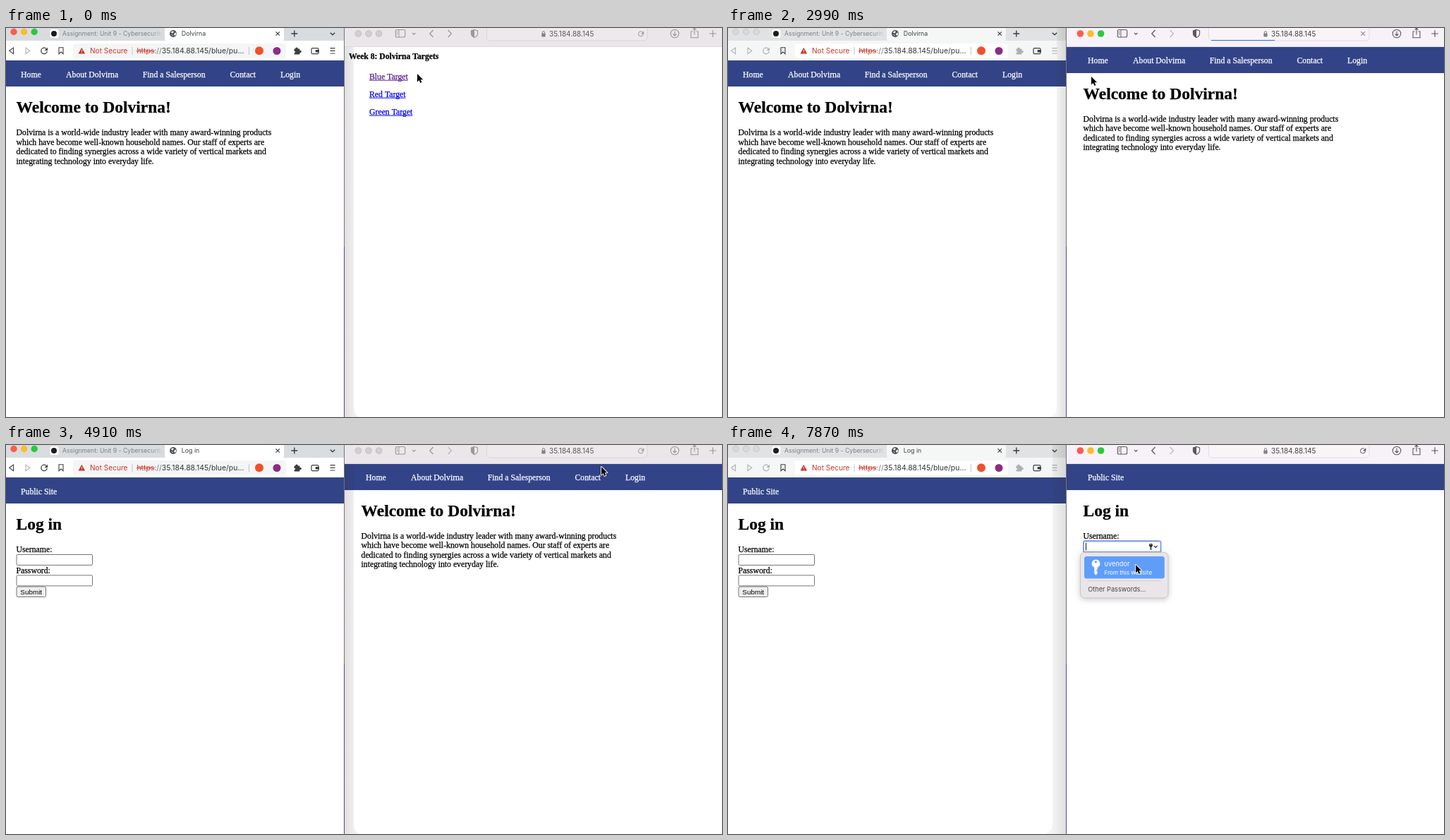
Write an HTML page with a canvas that moves like this. It is 1015 px wide and 552 px high and loops after 8 s.

```html
<!DOCTYPE html>
<html lang="en">
<head>
<meta charset="utf-8">
<title>Two browser windows</title>
<style>
html, body { margin: 0; width: 100%; height: 100%; overflow: hidden; background: #fff; }
canvas { display: block; }
</style>
</head>
<body>
<canvas id="stage" width="1015" height="552"></canvas>
<script>
const ctx = document.getElementById('stage').getContext('2d');
const LOOP = 8000, W = 1015, H = 552, SPLIT = 480;
const SERIF = '"Liberation Serif", serif';
const UI = 'Inter, sans-serif';
const ARIAL = '"Liberation Sans", sans-serif';
const BRAND = 'Dolvirna';
const USER = 'uvendor';
const NAVY = '#324487';

// Pointer positions, held until the next entry: time, x, y, hand?
const pointer = [
  [0, 583, 65], [150, 578, 66], [300, 562, 69], [450, 550, 70], [600, 548, 70], [740, 548, 70, 1],
  [2540, 548, 70], [2840, 545, 70], [2990, 515, 69], [3130, 455, 68], [3280, 418, 67], [3430, 405, 66],
  [3570, 404, 66], [4170, 404, 66, 1], [4320, 404, 66], [4470, 425, 64], [4620, 560, 52], [4760, 720, 38],
  [4910, 844, 31], [5060, 940, 34], [5200, 976, 40], [5350, 950, 44], [5500, 905, 47], [5650, 894, 47],
  [5800, 894, 48, 1], [6400, 894, 46], [6990, 850, 70], [7140, 730, 130], [7280, 630, 178],
  [7430, 585, 185], [7580, 582, 180], [7730, 578, 172], [7870, 578, 170]
];

// Loading bar lengths: time, width
const progress = [
  [0, 0], [2690, 35], [2990, 90], [3280, 160], [3570, 221], [3720, 0],
  [6550, 12], [6700, 24], [6840, 35], [7140, 80], [7430, 130], [7580, 180], [7730, 221], [7870, 0]
];

const between = (t, a, b) => t >= a && t < b;

function held(keys, t) {
  let found = keys[0];
  for (const key of keys) if (key[0] <= t) found = key;
  return found;
}

function rect(x, y, w, h, color) {
  ctx.fillStyle = color;
  ctx.fillRect(x, y, w, h);
}

function rounded(x, y, w, h, r, fill, line, width = 1) {
  ctx.beginPath();
  ctx.roundRect(x, y, w, h, r);
  if (fill) { ctx.fillStyle = fill; ctx.fill(); }
  if (line) { ctx.strokeStyle = line; ctx.lineWidth = width; ctx.stroke(); }
}

function disc(x, y, r, color) {
  ctx.fillStyle = color;
  ctx.beginPath();
  ctx.arc(x, y, r, 0, Math.PI * 2);
  ctx.fill();
}

function ring(x, y, r, color, width = 1, from = 0, to = Math.PI * 2) {
  ctx.strokeStyle = color;
  ctx.lineWidth = width;
  ctx.beginPath();
  ctx.arc(x, y, r, from, to);
  ctx.stroke();
}

function stroke(d, color, width = 1) {
  ctx.strokeStyle = color;
  ctx.lineWidth = width;
  ctx.stroke(new Path2D(d));
}

function fill(d, color) {
  ctx.fillStyle = color;
  ctx.fill(new Path2D(d));
}

function text(str, x, y, size, color = '#000', family = SERIF, weight = 400, align = 'left') {
  ctx.font = `${weight} ${size}px ${family}`;
  ctx.fillStyle = color;
  ctx.textAlign = align;
  ctx.fillText(str, x, y);
  if (family === SERIF) {
    // A hairline gives the page text its heavier stems
    ctx.strokeStyle = color;
    ctx.lineWidth = 0.25;
    ctx.strokeText(str, x, y);
  }
  return ctx.measureText(str).width;
}

function label(str, x, y, size, color, weight) {
  return text(str, x, y + size * 0.36, size, color, UI, weight);
}

function lights(x, y, gap, r, on, off) {
  ['#fc5b52', '#fdbb2d', '#2bc840'].forEach((c, i) => {
    disc(x + gap * i, y, r, on ? c : off);
    if (!on) ring(x + gap * i, y, r - 0.5, 'rgba(0,0,0,.08)');
  });
}

function reload(x, y, color, r = 4.2, width = 1.3) {
  ring(x, y, r, color, width, 0.1, 5.4);
  fill(`M${x + r + 0.8} ${y - r - 0.6}v4.4h-4.4z`, color);
}

function cross(x, y, r, color, width = 1.2) {
  stroke(`M${x - r} ${y - r}l${2 * r} ${2 * r}m0 ${-2 * r}l${-2 * r} ${2 * r}`, color, width);
}

function plus(x, y, r, color, width = 1.4) {
  stroke(`M${x - r} ${y}h${2 * r}M${x} ${y - r}v${2 * r}`, color, width);
}

function nav(x, y, width, items) {
  rect(x, Math.round(y), width, 37, NAVY);
  const offsets = [21, 85, 193.7, 317.5, 389];
  const shift = x ? 489 : 0;
  items.forEach((item, i) => text(item, shift + offsets[i], y + 23.5, 11.77, '#fff'));
}

function homePage(x, y, width) {
  nav(x, y, width, ['Home', `About ${BRAND}`, 'Find a Salesperson', 'Contact', 'Login']);
  const left = x ? 503.5 : 14.5;
  text(`Welcome to ${BRAND}!`, left, y + 74, 23.5, '#000', SERIF, 700);
  [
    `${BRAND} is a world-wide industry leader with many award-winning products`,
    'which have become well-known household names. Our staff of experts are',
    'dedicated to finding synergies across a wide variety of vertical markets and',
    'integrating technology into everyday life.'
  ].forEach((line, i) => text(line, left, y + 106.2 + i * 13.5, 11.77));
}

function loginPage(x, y, width) {
  nav(x, y, width, ['Public Site']);
  const left = x ? 503.5 : 14.5;
  text('Log in', left, y + 74, 23.5, '#000', SERIF, 700);
  ['Username:', 'Password:'].forEach((name, i) => {
    const top = y + 106.2 + i * 29.4;
    text(name, left, top, 11.77);
    rounded(left + 0.5, top + 3.3, 107.5, 15, 1.5, '#fff', '#767676');
  });
  rounded(left + 0.5, y + 155, 41.5, 14.5, 2, '#efefef', '#767676');
  text('Submit', left + 21.2, y + 165.6, 9.9, '#000', ARIAL, 400, 'center');
}

function targetPage() {
  text(`Week 8: ${BRAND} Targets`, 486, 43.5, 11.65, '#000', SERIF, 700);
  ['Blue', 'Red', 'Green'].forEach((name, i) => {
    const color = i ? '#0000ee' : '#551a8b';
    const y = 72.5 + i * 25;
    const w = text(`${name} Target`, 515, y, 11.77, color);
    rect(515, y + 1.3, w, 0.9, color);
  });
}

function leftChrome(active, title) {
  const dark = '#3b3e42', faint = '#aeb1b4';
  const ink = active ? dark : faint;
  rect(0, 0, 479, 18, active ? '#d8dcdf' : '#e0e2e3');
  rounded(225, -8, 169, 28, 5, active ? '#fff' : '#f5f6f6');
  rect(0, 18, 479, 28, active ? '#fff' : '#f5f6f6');
  lights(11, 5.5, 14.6, 4.7, active, '#d7d9da');

  // Tabs
  rounded(62.5, 2, 12, 12, 2, '#fff');
  disc(68, 8, 4, '#1c1c1c');
  const fade = ctx.createLinearGradient(204, 0, 221, 0);
  fade.addColorStop(0, '#7d8084');
  fade.addColorStop(1, 'rgba(125,128,132,.15)');
  ctx.save();
  ctx.beginPath();
  ctx.rect(60, 0, 161, 18);
  ctx.clip();
  label('Assignment: Unit 9 - Cybersecurity', 80, 8, 8.65, fade);
  ctx.restore();
  disc(237, 8, 5, '#4b4f54');
  fill('M233.5 6l3-2 1.5 1.5-2 2.3zM239 7l2.2-.6.2 3-2 1.5-1.6-1.6zM234 9l2.3.8.2 2z', '#e8eaec');
  label(title, 248.8, 8, 8.8, '#3c4043');
  cross(385.2, 8, 2.7, dark);
  plus(408.8, 8, 4.4, dark);
  stroke('M459.8 6.7l3.2 3 3.2-3', dark, 1.4);

  // Toolbar
  stroke('M10.5 28v8.6l-5.8-4.3z', ink, 1.1);
  stroke('M28 28v8.6l5.8-4.3z', faint, 1.1);
  reload(54, 32.4, ink);
  stroke('M75 27.7h6v9l-3-2.6-3 2.6z', dark, 1.1);
  rounded(95, 22, 302, 20.5, 3, active ? '#f4f5f6' : '#fff');
  fill('M107.3 27.8l4.8 8.7h-9.6z', '#ca3427');
  rect(106.9, 30.8, 0.9, 2.8, '#fff');
  rect(106.9, 34.4, 0.9, 0.9, '#fff');
  label('Not Secure', 119, 32.3, 10.1, '#ca3427');
  rect(178.5, 27, 1, 11, '#c2c5c8');
  const size = 10.45;
  const w = label('https', 185.4, 32.3, size, '#ca3427');
  rect(185, 32.2, w + 0.6, 1, '#ca3427');
  const sep = label('://', 185.4 + w, 32.3, size, '#74787c');
  label('35.184.88.145/blue/pu...', 185.4 + w + sep, 32.3, size, '#34373b');
  rect(344, 27, 1, 11, '#c2c5c8');
  disc(359, 32.3, 6, '#f0502a');
  disc(384, 32.5, 5.5, '#8c2b83');

  rounded(408.5, 29.5, 8, 8, 1, ink);
  disc(412, 29.2, 1.8, ink);
  disc(417, 33.5, 1.8, ink);
  disc(408.7, 34, 1.3, active ? '#fff' : '#f5f6f6');
  rounded(433, 28.7, 10, 8, 1.5, null, dark, 1.2);
  rounded(438.7, 31, 5.2, 3.5, 0.6, dark);
  stroke('M459.5 28.6h7M459.5 32.3h7M459.5 36h7', ink, 1.2);
}

function rightChrome(t, active) {
  const ink = active ? '#5b585c' : '#9a969a';
  const faint = '#bcb8bc';
  rect(SPLIT, 0, W - SPLIT, 27, active ? '#f7f2f7' : '#ebe6ea');
  rect(SPLIT, 26.3, W - SPLIT, 0.7, '#d9d4d9');
  lights(499.4, 8, 14.6, 4.8, active, '#d3ced2');

  rounded(552.3, 2.5, 13.4, 10.5, 2, null, ink, 1.1);
  stroke('M557 2.5v10.5M553.8 5h1.8M553.8 7h1.8M553.8 9h1.8', ink, 0.9);
  stroke('M576 7l2.2 2.2 2.2-2.2', ink, 1.1);
  stroke('M605.5 3l-4.7 5 4.7 5', ink, 1.3);
  stroke('M626.7 3l4.7 5-4.7 5', t < 2840 ? ink : faint, 1.3);
  const shield = 'M664 2.3l4.6 1.6v4.2c0 2.7-2.1 4.4-4.6 5.6-2.5-1.2-4.6-2.9-4.6-5.6v-4.2z';
  stroke(shield, ink, 1.1);
  fill('M664 2.3v11.4c-2.5-1.2-4.6-2.9-4.6-5.6v-4.2z', ink);

  rounded(681.5, -6, 227.5, 24, 5, active ? '#f8f4f8' : '#eee9ed', active ? '#e2dce2' : '#d9d4d8');
  const loading = between(t, 2540, 3430) || between(t, 6400, 7870);
  const locked = !between(t, 2540, 2840);
  const shade = active ? '#454246' : '#5e5a5e';
  if (locked) {
    rounded(759.3, 7.6, 5.4, 4.8, 0.8, '#858185');
    stroke('M760.4 8v-1.8a1.6 1.6 0 0 1 3.2 0v1.8', '#858185', 1);
  }
  label('35.184.88.145', locked ? 770 : 764, 8.6, 10, shade);
  if (loading) cross(900.3, 8, 3, ink, 1);
  else reload(900, 8.3, ink, 3.5, 1);
  const bar = held(progress, t)[1];
  rect(685, 17, bar, 1, active ? '#2f73df' : '#bdb8bd');

  ring(948, 8, 5.8, ink, 1.1);
  stroke('M948 4.6v6.2m-2.4-2.3l2.4 2.4 2.4-2.4', ink, 1.1);
  const share = between(t, 6550, 6840) ? faint : ink;
  stroke('M973.5 5h-2.5v8.7h10v-8.7h-2.5M976 9.5v-9.2m-2.5 2.4l2.5-2.5 2.5 2.5', share, 1.1);
  plus(1002, 8, 4.8, ink, 1.2);
}

function key(x, y, s, color, hole) {
  disc(x, y, 5.9 * s, color);
  fill(`M${x - 2.2 * s} ${y + 4 * s}h${4.4 * s}v${4 * s}l${-1.6 * s} ${1.8 * s} ${1.6 * s} ${1.8 * s}` +
    `v${2.2 * s}l${-2.2 * s} ${2.6 * s} ${-2.2 * s} ${-2.2 * s}z`, color);
  disc(x, y - 2.4 * s, 1.6 * s, hole);
}

function passwordMenu(t) {
  rounded(504, 136.5, 109.5, 15.5, 1.5, '#fff', '#7ea2f2', 2);
  if (!between(t, 7280, 7730)) rect(507, 139, 1, 10.5, '#111');
  key(599.5, 142.3, 0.42, '#222', '#fff');
  stroke('M603.7 143l2.5 2.5 2.5-2.5', '#333', 1.1);

  const picked = t >= 7430;
  ctx.save();
  ctx.shadowColor = 'rgba(0,0,0,.22)';
  ctx.shadowBlur = 8;
  ctx.shadowOffsetY = 2;
  rounded(499.5, 152.5, 124.5, 64.5, 6, '#e9e5e8');
  ctx.restore();
  rounded(499.5, 152.5, 124.5, 64.5, 6, null, '#c6c2c5', 0.9);
  if (picked) rounded(505, 158, 113.8, 31.5, 3.5, '#609dfb');
  key(521.5, 168.3, 1, picked ? '#fff' : '#6e6b6e', picked ? '#609dfb' : '#e9e5e8');
  label(USER, 533.6, 168.6, 9.2, picked ? '#fff' : '#434043');
  label('From this website', 533.6, 180.9, 8.15, picked ? '#fff' : '#706c70');
  rect(510, 192.3, 103.5, 0.9, '#cdc9cc');
  label('Other Passwords...', 510.2, 204.3, 9.2, '#4a474a');
}

// Shadow the front window casts on its neighbour
function castShadow(rightActive, t) {
  const edge = rightActive ? (t < 4000 ? 466 : 460) : 493;
  const near = rightActive ? 479 : SPLIT;
  const curve = rightActive ? -10 : 7;
  const g = ctx.createLinearGradient(near, 0, edge, 0);
  g.addColorStop(0, 'rgba(50,40,50,.15)');
  g.addColorStop(1, rightActive ? 'rgba(50,40,50,.05)' : 'rgba(70,40,65,.08)');
  const top = rightActive ? 0 : 27;
  fill(`M${near} ${top}H${edge}V538Q${edge} 548 ${edge + curve} 552H${near}z`, g);
}

function drawPointer(t) {
  const [, x, y, hand] = held(pointer, t);
  ctx.save();
  ctx.translate(x, y);
  ctx.lineJoin = 'round';
  if (hand) {
    const d = 'M-1.3 .8c0-1.5 2.1-1.5 2.3 0l.6 3.2c.5-.8 1.7-.7 2 .2.6-.6 1.6-.4 1.8.4.8-.4 1.6.1 1.6 1' +
      'v2.8c0 1.2-.9 1.8-1 3.2h-5.3c-.6-1.9-2.2-2.9-3.1-4.5-.6-1.2.7-1.9 1.5-1l1 .9z';
    fill(d, '#fff');
    stroke(d, '#111', 0.9);
  } else {
    const d = 'M0 0v11.4l2.6-2.4 1.8 4 2-.9-1.8-3.9h3.6z';
    stroke(d, '#fff', 1.8);
    fill(d, '#000');
  }
  ctx.restore();
}

function draw(t) {
  const rightActive = between(t, 600, 3570) || t >= 5650;
  const leftLogin = t >= 4320;
  rect(0, 0, W, H, '#fff');

  leftChrome(!rightActive, leftLogin ? 'Log in' : BRAND);
  (leftLogin ? loginPage : homePage)(0, 46, 479);

  if (t < 2840) targetPage();
  else if (t < 6700) homePage(SPLIT, 26.5, W - SPLIT);
  else loginPage(SPLIT, 26.5, W - SPLIT);
  rightChrome(t, rightActive);
  castShadow(rightActive, t);
  if (t >= 6840) passwordMenu(t);

  rect(479, 0, 1, H, '#74747a');
  rect(479, 310, 1, H - 310, '#584a80');
  drawPointer(t);
}

const start = performance.now();
function tick() {
  draw((performance.now() - start) % LOOP);
  requestAnimationFrame(tick);
}
tick();
</script>
</body>
</html>
```
